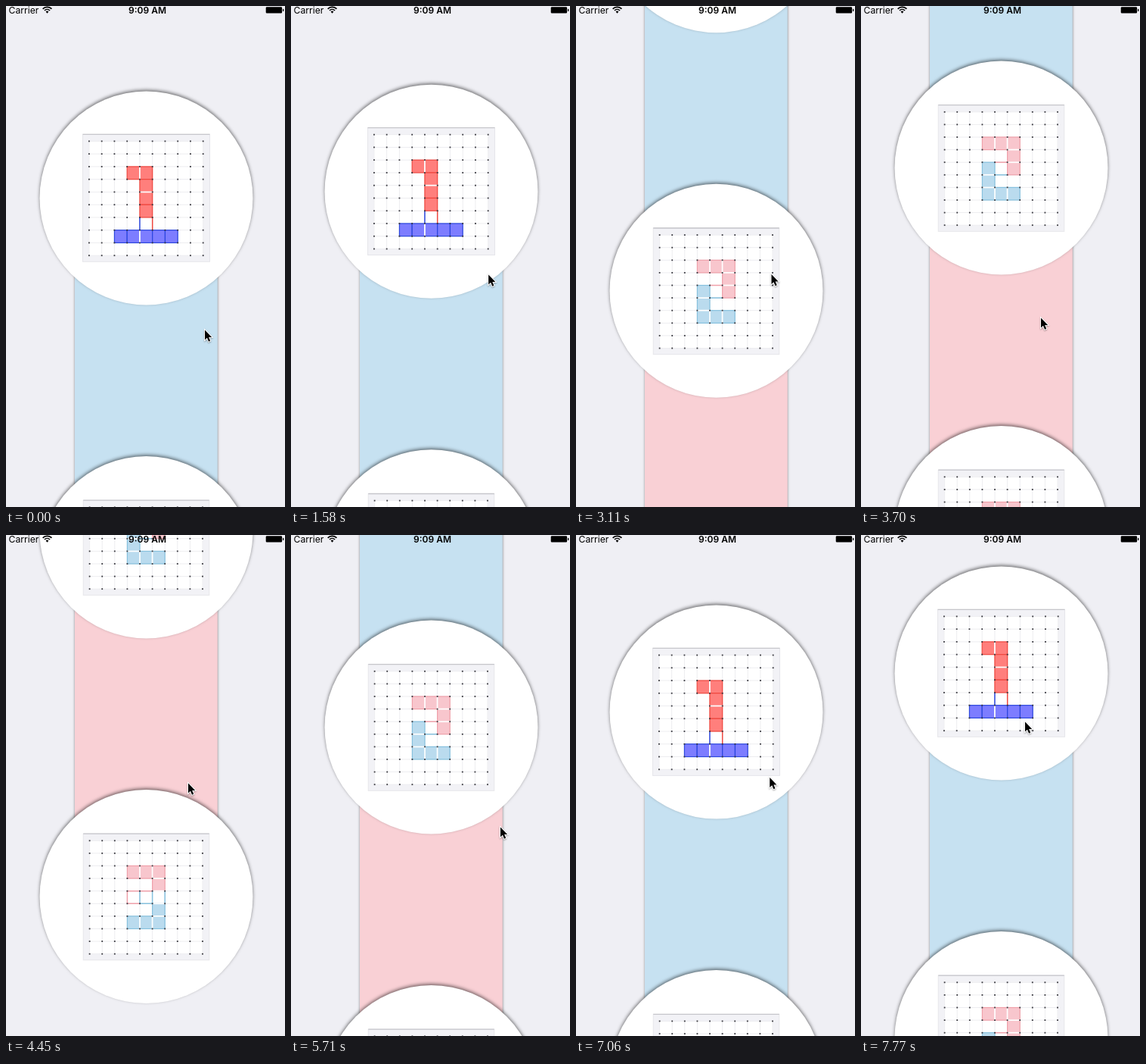
These frames come from a looping animation (369x661 px, 8000 ms). An HTML page with a canvas:

```html
<!DOCTYPE html>
<html lang="en">
<head>
<meta charset="utf-8">
<title>Number trail</title>
<style>
  html, body { margin: 0; width: 100%; height: 100%; overflow: hidden; background: #efeff4; }
  canvas { display: block; }
</style>
</head>
<body>
<canvas width="369" height="661"></canvas>
<script>
const ctx = document.querySelector('canvas').getContext('2d');
const W = 369, H = 661, LOOP = 8000, STEP = 85;
const CX = 185.5, FIRST_Y = 253.5, SPACING = 481.5, RADIUS = 141;

// Time, scroll, pointer x, pointer y
const KEYS = [
  [570, 0, 262, 426],
  [960, 0, 294, 235],
  [1400, 0, 259, 357],
  [2480, 212, 278, 295],
  [3700, 521.5, 237, 410],
  [4450, 739.5, 240, 326],
  [4660, 739.5, 240, 326],
  [5710, 481.5, 276, 384],
  [6390, 56, 291, 395],
  [6700, 5, 277, 362],
  [7770, 71, 216, 245]
];

const RED = { fill: '#ff7f7c', line: '#f0473f' };
const BLUE = { fill: '#7d7dff', line: '#2b46de' };
const PINK = { fill: '#f8c6cd', line: '#f0a0aa' };
const SKY = { fill: '#badbee', line: '#86c1de' };

// Rows start at grid cell (2, 2): a and b are coloured cells, o is a hollow overlap.
// Edges are extra outlines in grid units.
const PUZZLES = [
  {
    half: 84, reach: 75.4, shift: 0.3, a: RED, b: BLUE,
    rows: ['.aa..', '..a..', '..a..', '..a..', '..o..', 'bbbbb'],
    edges: { a: 'M5 6V7', b: 'M4 6V7' },
    hasSeam: n => n === 4
  },
  {
    half: 83.3, reach: 74.7, shift: 1, a: PINK, b: SKY,
    rows: ['.aaa.', '...a.', '.b.a.', '.b...', '.bbb.'],
    edges: { a: 'M4 4H5', b: 'M4 5H5' },
    hasSeam: () => true
  },
  {
    half: 83.3, reach: 74.7, shift: 1, a: PINK, b: SKY,
    rows: ['.aaa.', '...a.', '.ooo.', '...b.', '.bbb.'],
    edges: { a: 'M5 4H3V5H4', b: 'M6 4V5M4 4V5H5V4' },
    hasSeam: () => true
  }
];

function slope(i, col) {
  const a = KEYS[i], b = KEYS[i + 1];
  return a && b ? (b[col] - a[col]) / (b[0] - a[0]) : 0;
}

// Harmonic mean of both sides, flat at turning points
function tangent(i, col) {
  const before = slope(i - 1, col), after = slope(i, col);
  return before * after > 0 ? 2 * before * after / (before + after) : 0;
}

// Cubic motion through the keys, held in equal steps of about STEP ms
function pose(t) {
  const i = KEYS.findLastIndex(key => key[0] <= t);
  if (i < 0) return KEYS[0];
  if (i === KEYS.length - 1) return KEYS[i];
  const a = KEYS[i], b = KEYS[i + 1], span = b[0] - a[0];
  const steps = Math.round(span / STEP);
  const u = Math.floor((t - a[0]) / span * steps) / steps, v = 1 - u;
  return a.map((from, col) => v * v * (1 + 2 * u) * from + u * u * (3 - 2 * u) * b[col]
    + span * u * v * (v * tangent(i, col) - u * tangent(i + 1, col)));
}

function shadowed(color, alpha, blur, dy, draw) {
  ctx.save();
  ctx.fillStyle = color;
  ctx.shadowColor = `rgba(0,0,0,${alpha})`;
  ctx.shadowBlur = blur;
  ctx.shadowOffsetY = dy;
  draw();
  ctx.restore();
}

function line(x1, y1, x2, y2, color, width) {
  ctx.strokeStyle = color;
  ctx.lineWidth = width;
  ctx.beginPath();
  ctx.moveTo(x1, y1);
  ctx.lineTo(x2, y2);
  ctx.stroke();
}

function drawRibbon(y, color) {
  shadowed(color, 0.45, 3, 0, () => ctx.fillRect(91, y, 188.7, SPACING));
}

function drawPanel(y, half) {
  const left = CX - half, top = y - half;
  ctx.fillStyle = '#f2f2f6';
  ctx.fillRect(left, top, half * 2, half * 2);
  ctx.strokeStyle = '#e6e6ea';
  ctx.lineWidth = 1;
  ctx.strokeRect(left, top, half * 2, half * 2);
  line(left, top, left + half * 2, top, '#c6c6cb', 1.3);
}

function drawPuzzle(y, puzzle) {
  const { half, reach, shift, rows, edges, hasSeam } = puzzle;
  const cell = reach * 2 / 9, px = 1 / cell;
  drawPanel(y + shift - 0.5, half);

  ctx.save();
  ctx.translate(CX - 0.2 - reach, y + shift - reach);
  ctx.scale(cell, cell);
  ctx.fillStyle = '#fff';
  ctx.fillRect(0, 0, 9, 9);
  for (let n = 0; n < 10; n++) {
    line(n, 0, n, 9, '#ededf0', px);
    line(0, n, 9, n, '#ededf0', px);
  }

  const at = (c, r) => (rows[r - 2] ?? '')[c - 2] ?? '.';
  const eachCell = draw => {
    for (let r = 2; r < 8; r++)
      for (let c = 2; c < 7; c++) if (at(c, r) !== '.') draw(c, r, at(c, r));
  };
  eachCell((c, r, kind) => {
    if (kind === 'o') return;
    ctx.fillStyle = puzzle[kind].fill;
    ctx.strokeStyle = puzzle[kind].line;
    ctx.lineWidth = 1.2 * px;
    ctx.fillRect(c, r, 1, 1);
    ctx.strokeRect(c, r, 1, 1);
  });
  // White seams between neighbours
  const joined = (kind, other) => other !== '.' && kind + other !== 'oo';
  eachCell((c, r, kind) => {
    if (hasSeam(c) && joined(kind, at(c - 1, r))) line(c, r, c, r + 1, '#fff', 1.8 * px);
    if (hasSeam(r) && joined(kind, at(c, r - 1))) line(c, r, c + 1, r, '#fff', 1.8 * px);
  });
  for (const kind in edges) {
    ctx.strokeStyle = puzzle[kind].line;
    ctx.lineWidth = 1.5 * px;
    ctx.stroke(new Path2D(edges[kind]));
  }

  ctx.fillStyle = '#38383e';
  const dot = 1.8 * px;
  for (let c = 0; c < 10; c++)
    for (let r = 0; r < 10; r++) ctx.fillRect(c - dot / 2, r - dot / 2, dot, dot);
  ctx.restore();
}

function drawDisc(y, puzzle) {
  ctx.beginPath();
  ctx.arc(CX, y, RADIUS, 0, Math.PI * 2);
  shadowed('#fff', 0.5, 4.5, -2, () => ctx.fill());
  drawPuzzle(y, puzzle);
}

function drawStatusBar() {
  ctx.fillStyle = ctx.strokeStyle = '#000';
  ctx.textAlign = 'left';
  ctx.font = '400 12.2px Inter, sans-serif';
  ctx.fillText('Carrier', 3.5, 9.7);
  ctx.textAlign = 'center';
  ctx.font = '600 12px Inter, sans-serif';
  ctx.fillText('9:09 AM', 187, 9.7);

  const fan = radius => ctx.arc(54.5, 9.3, radius, -Math.PI * 0.76, -Math.PI * 0.24);
  ctx.lineWidth = 1.7;
  for (const radius of [4.8, 8]) {
    ctx.beginPath();
    fan(radius);
    ctx.stroke();
  }
  ctx.beginPath();
  ctx.moveTo(54.5, 9.8);
  fan(2.6);
  ctx.fill();

  ctx.beginPath();
  ctx.roundRect(343.7, 1.3, 21.4, 8.2, 1.3);
  ctx.roundRect(366, 3.7, 1.3, 3.4, 0.6);
  ctx.fill();
}

const arrow = new Path2D('M0 0V15L3.4 11.8L5.8 17.4L8.3 16.3L5.9 10.8H10.5Z');

function drawPointer(x, y) {
  ctx.save();
  ctx.translate(x + 1, y + 1.5);
  ctx.scale(0.87, 0.87);
  ctx.strokeStyle = '#fff';
  ctx.lineWidth = 2.2;
  shadowed('#000', 0.35, 2, 1, () => ctx.stroke(arrow));
  ctx.fillStyle = '#000';
  ctx.fill(arrow);
  ctx.restore();
}

function render(t) {
  const [, scroll, x, y] = pose(t);
  const top = FIRST_Y - scroll;
  ctx.fillStyle = '#efeff4';
  ctx.fillRect(0, 0, W, H);
  drawRibbon(top, '#c6e1f1');
  drawRibbon(top + SPACING, '#f9d0d5');
  PUZZLES.forEach((puzzle, i) => drawDisc(top + i * SPACING, puzzle));
  drawStatusBar();
  drawPointer(x, y);
}

const begin = performance.now();
(function tick() {
  render((performance.now() - begin) % LOOP);
  requestAnimationFrame(tick);
})();
</script>
</body>
</html>
```
